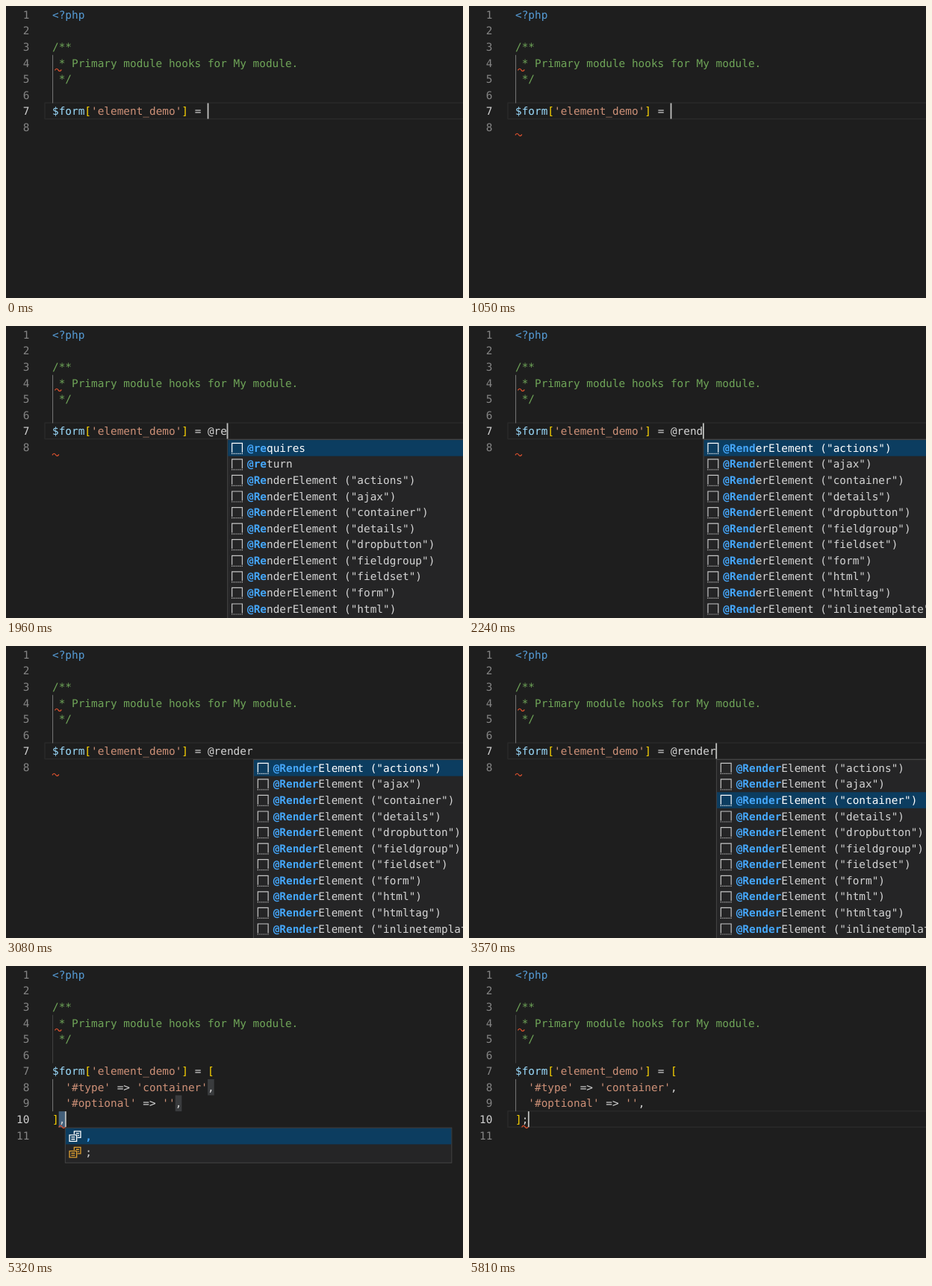
An HTML page that plays this animation: 612 by 392 pixels, repeating every 5950 ms.

```html
<!DOCTYPE html>
<html lang="en">
<head>
<meta charset="utf-8">
<title>Editor autocomplete</title>
<style>
  html, body { margin: 0; width: 100%; height: 100%; overflow: hidden; background: #1e1e1e; }
  svg { display: block; }
  text {
    font: 14.4px "DejaVu Sans Mono", monospace;
    fill: #d4d4d4;
    white-space: pre;
    text-rendering: geometricPrecision;
  }
  .tag { fill: #569cd6; }
  .com { fill: #6fa558; }
  .var { fill: #9cdcfe; }
  .str { fill: #ce9178; }
  .brk { fill: #ffd700; }
  .num { fill: #858585; text-anchor: end; }
  .now { fill: #d0d0d0; }
  .hit { fill: #45a7fb; font-weight: bold; }
  .on { fill: #fff; }
  .wave { fill: none; stroke: #e5532f; stroke-width: 1.2; }
</style>
</head>
<body>
<svg id="stage" width="612" height="392" viewBox="0 0 612 392"></svg>
<script>
(() => {
const LOOP = 5950, LEFT = 62, CHAR = 8.668, LINE = 21.57;
const stage = document.getElementById('stage');

const docTags = ['api', 'author', 'category', 'copyright', 'deprecated', 'example',
  'filesource', 'global', 'ignore', 'internal', 'license'].map(n => '@' + n);
const elements = ['actions', 'ajax', 'container', 'details', 'dropbutton', 'fieldgroup',
  'fieldset', 'form', 'html', 'htmltag', 'inlinetemplate'].map(n => `@RenderElement ("${n}")`);
const returns = ['@requires', '@return', ...elements.slice(0, 9)];

// Each step changes part of the editor state.
const steps = [
  [0, { typed: '', caret: true, wave: null, list: null, pick: 0, done: false, end: ',' }],
  [490, { caret: false }],
  [770, { wave: [8, 0] }],
  [1050, { caret: true }],
  [1540, { typed: '@' }],
  [1610, { list: docTags }],
  [1890, { typed: '@r', list: returns }],
  [1960, { typed: '@re' }],
  [2170, { typed: '@ren', list: elements }],
  [2240, { typed: '@rend' }],
  [2450, { typed: '@rende' }],
  [2520, { typed: '@render' }],
  [3080, { caret: false }],
  [3290, { pick: 1 }],
  [3430, { pick: 2 }],
  [3570, { caret: true }],
  [4130, { caret: false }],
  [4340, { done: true, caret: true, wave: [11, 0], list: [',', ';'], pick: 0 }],
  [4830, { caret: false }],
  [5110, { wave: [10, 1] }],
  [5320, { caret: true }],
  [5530, { pick: 1 }],
  [5810, { end: ';', list: null }]
];
let last = {};
const states = steps.map(([at, change]) => ({ at, ...(last = { ...last, ...change }) }));

const lineY = n => 1 + LINE * (n - 1);
const colX = n => LEFT + CHAR * n;
const esc = s => s.replace(/&/g, '&amp;').replace(/</g, '&lt;');
const span = (cls, s) => `<tspan class="${cls}">${esc(s)}</tspan>`;
const text = (x, y, body, cls = '') =>
  `<text x="${x}" y="${y + 15.8}" class="${cls}" xml:space="preserve">${body}</text>`;
const rect = (x, y, w, h, fill, more = '') =>
  `<rect x="${x}" y="${y}" width="${w}" height="${h}" fill="${fill}" ${more}/>`;
const wave = (x, y) =>
  `<path class="wave" d="M${x} ${y + 1.8}q2.2 -4 4.4 -.6t4.4 -.4"/>`;

function codeLines(s) {
  const head = span('var', '$form') + span('brk', '[') + span('str', "'element_demo'") +
    span('brk', ']') + ' = ';
  const lines = [
    span('tag', '<?php'), '', span('com', '/**'),
    span('com', ' * Primary module hooks for My module.'), span('com', ' */'), ''
  ];
  if (!s.done) return [...lines, head + s.typed, ''];
  const entry = (key, value) => '  ' + span('str', key) + ' =&gt; ' + span('str', value) + ',';
  return [...lines, head + span('brk', '['),
    entry("'#type'", "'container'"), entry("'#optional'", "''"),
    span('brk', ']') + s.end, ''];
}

function snippetIcon(x, y, color) {
  return `<g fill="none" stroke="${color}" stroke-width="1.2">
    <path d="M${x + .6} ${y + 13}V${y + .6}H${x + 14.4}V${y + 13}"/>
    <path d="M${x} ${y + 14.6}h15" stroke-dasharray="1.3 1.4"/></g>`;
}

function enumIcon(x, y, color) {
  return `<g fill="none" stroke="${color}" stroke-width="1.3">
    <path d="M${x + 7} ${y + 4.5}V${y + .7}h8.6v8.4h-4.4M${x + 9.5} ${y + 3.5}h4M${x + 11.5} ${y + 6.3}h2"/>
    <path d="M${x + .7} ${y + 5.6}h9.6v8.6h-9.6zM${x + 3} ${y + 8.5}h5M${x + 3} ${y + 11.3}h5"/></g>`;
}

function popup(s, x, y) {
  const small = s.done;
  const left = x + (small ? 0 : .7);
  const width = small ? 517.5 : 420;
  const height = small ? 47 : 300;
  let out = rect(left, y + .5, width, height, '#252526', 'stroke="#454545"');
  s.list.forEach((label, i) => {
    const rowY = y + 1.1 + LINE * i;
    const on = i === s.pick;
    if (on) out += rect(left + .5, rowY, width - 1, LINE, '#0c3d60');
    out += small
      ? enumIcon(x + 5, rowY + 3.4, on ? '#fff' : '#e0a030')
      : snippetIcon(x + 6, rowY + 3.6, on ? '#fff' : '#c5c5c5');
    const hits = small ? +(i === 0) : s.typed.length;
    out += text(x + 27, rowY, span('hit', label.slice(0, hits)) + esc(label.slice(hits)), on ? 'on' : '');
  });
  return out;
}

function draw(s) {
  const row = s.done ? 10 : 7;
  const caretX = colX(s.done ? 2 : 24 + s.typed.length);
  const choosing = s.done && s.list;
  let out = rect(0, 0, 612, 392, '#1e1e1e');

  if (!choosing) {
    out += rect(52, lineY(row) - .4, 570, LINE, 'none', 'stroke="#2b2b2b" stroke-width="1.3"');
  }
  out += rect(62, lineY(4), 1.1, LINE * 3, s.done ? '#404040' : '#707070');
  if (s.done) out += rect(62, lineY(8), 1.1, LINE * 2, '#707070');
  if (choosing) {
    out += rect(colX(24), lineY(8), CHAR, LINE, '#3a3c3e');
    out += rect(colX(19), lineY(9), CHAR, LINE, '#3a3c3e');
    out += rect(colX(1), lineY(10), CHAR, LINE, '#435f7a');
  }

  codeLines(s).forEach((line, i) => {
    const n = i + 1;
    out += text(31.3, lineY(n), n, n === row ? 'num now' : 'num');
    out += text(LEFT, lineY(n), line);
  });

  out += wave(65.5, 84.6);
  if (s.wave) out += wave(colX(s.wave[1]), lineY(s.wave[0]) + 19.6);
  if (s.list) out += popup(s, caretX, lineY(row) + LINE);
  if (s.caret) out += rect(caretX - .4, lineY(row), 1.8, LINE - .5, '#c0c1bf');
  stage.innerHTML = out;
}

let shown = null;
function tick() {
  const t = performance.now() % LOOP;
  const state = states.findLast(s => s.at <= t);
  if (state !== shown) draw(shown = state);
  requestAnimationFrame(tick);
}
tick();
})();
</script>
</body>
</html>
```
